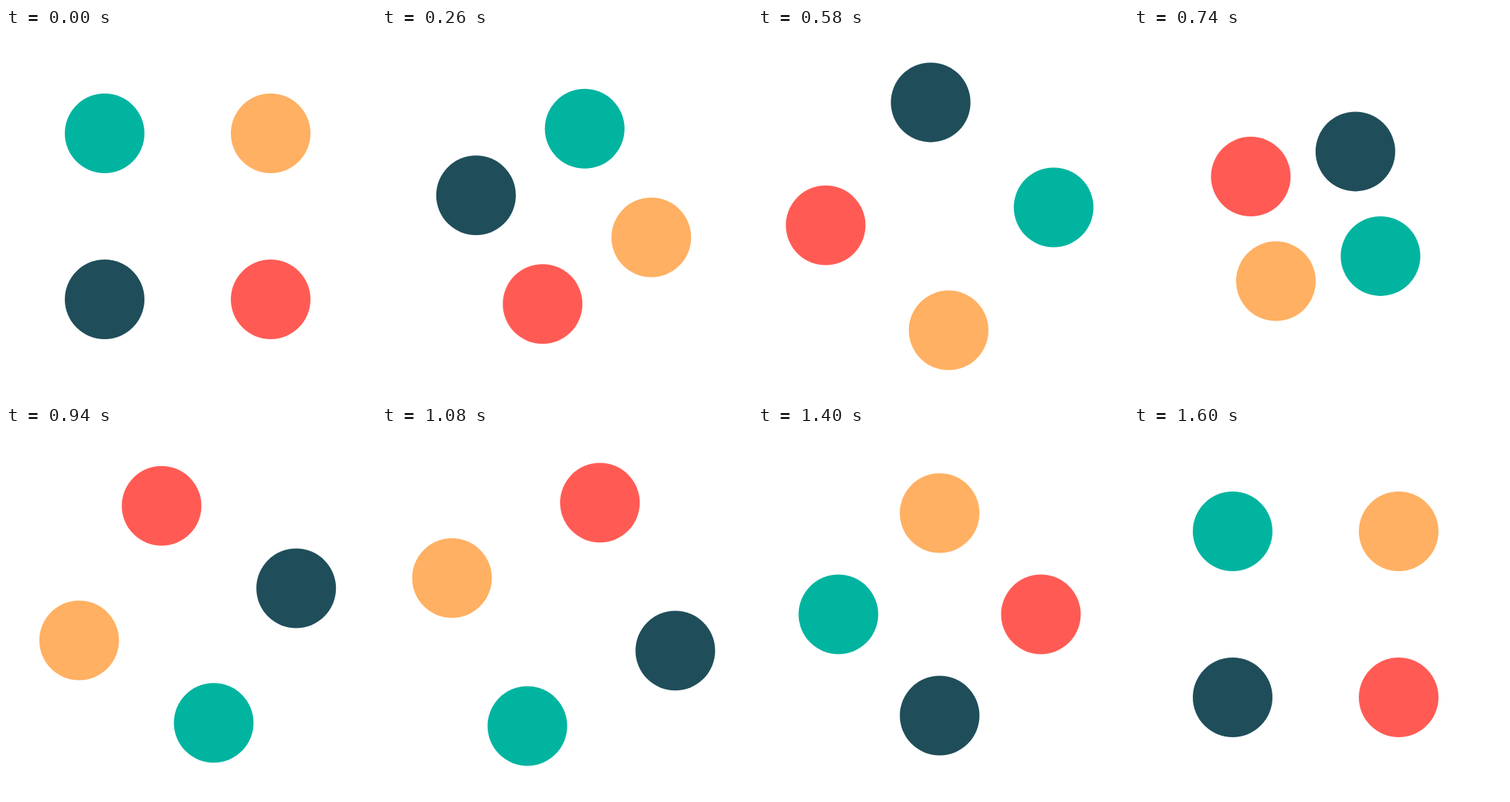
Animation, 497 px wide and 497 px high, one loop 1.62 s. Source, as an HTML page:

```html
<!DOCTYPE html>
<html lang="en">
<head>
<meta charset="utf-8">
<title>Four dots</title>
<style>
  html, body { margin: 0; width: 100%; height: 100%; overflow: hidden; background: #fff; }
  svg { display: block; width: 100vw; height: 100vh; }
</style>
</head>
<body>
<svg viewBox="0 0 497 497">
  <g id="ring" transform="translate(244 253)">
    <circle r="53.5" fill="#00b4a0"/>
    <circle r="53.5" fill="#ffb062"/>
    <circle r="53.5" fill="#ff5b54"/>
    <circle r="53.5" fill="#1f4e5a"/>
  </g>
</svg>
<script>
  const STEP = 20, STEPS = 81, PULSE = 27;
  const FAR = 157.7, DEPTH = 69, TURN = 0.314;
  const dots = document.querySelectorAll('#ring circle');

  // Quadratic fall towards the centre, then a slower quadratic return.
  function radius(p) {
    const k = p < TURN ? p / TURN : (1 - p) / (1 - TURN);
    return FAR - DEPTH * k * k;
  }

  function draw(now) {
    const step = Math.floor(now / STEP) % STEPS;
    const spin = step / (STEPS - 1) * 2 * Math.PI;
    const r = radius(step % PULSE / (PULSE - 1));
    dots.forEach((dot, i) => {
      const a = spin + (i / 2 - 0.75) * Math.PI;
      dot.setAttribute('cx', r * Math.cos(a));
      dot.setAttribute('cy', r * Math.sin(a));
    });
  }

  let start;
  function tick(now) {
    start ??= now;
    draw(now - start);
    requestAnimationFrame(tick);
  }
  draw(0);
  requestAnimationFrame(tick);
</script>
</body>
</html>
```
